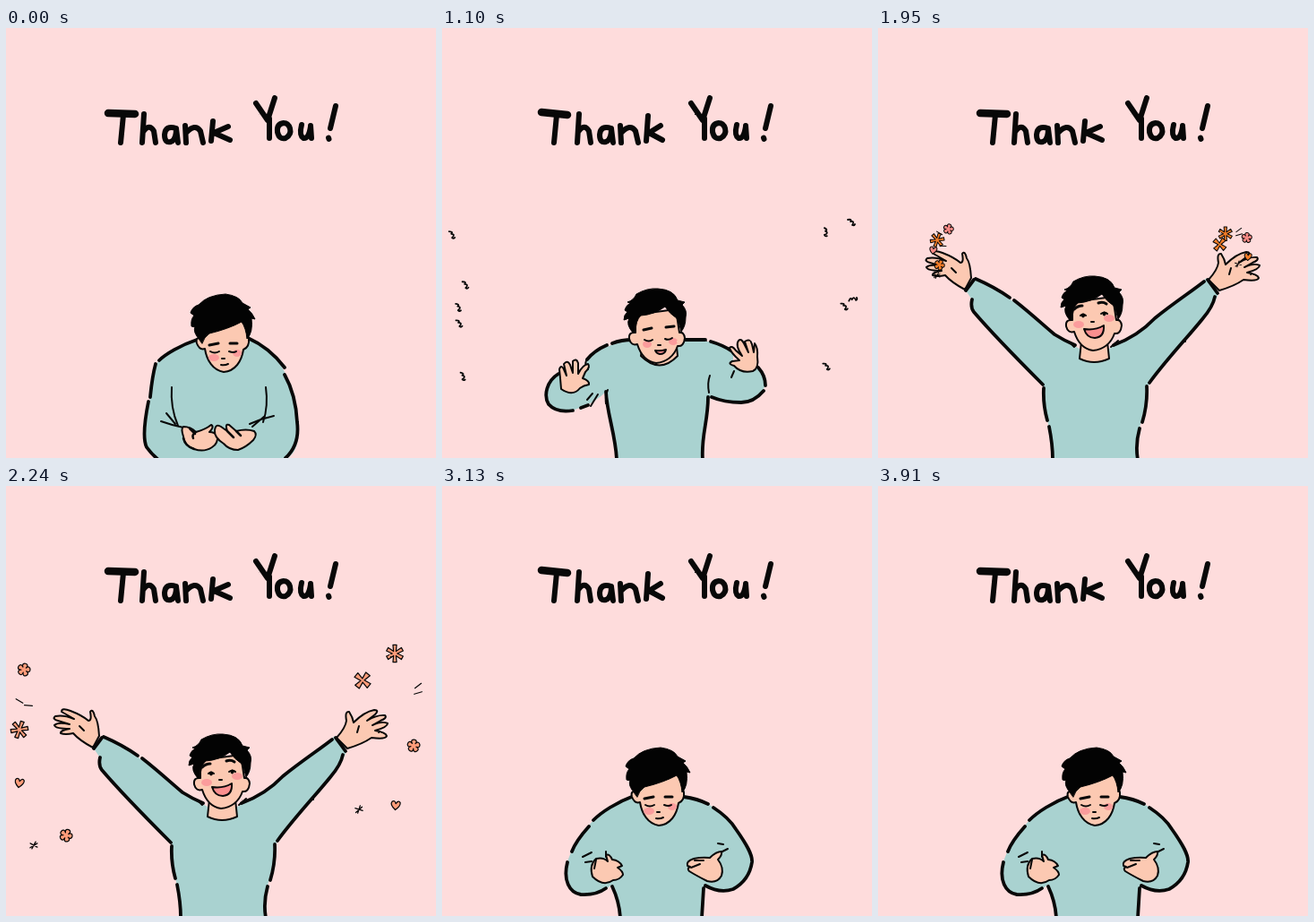
Recreate the animation shown at these times as an HTML page. Size 480 by 480 pixels, loop 4000 ms.

```html
<!DOCTYPE html>
<html lang="en">
<meta charset="utf-8">
<title>Thank You!</title>
<style>
  html, body { margin: 0; height: 100%; overflow: hidden; background: #fedcdc; }
  svg { display: block; width: 100vw; height: 100vh; }
  path, ellipse { fill: none; stroke: #080808; stroke-width: 2; stroke-linecap: round; stroke-linejoin: round; }
  .cloth { fill: #a9d2d0; stroke: none; }
  .skin { fill: #fcc9b2; }
  .hair { fill: #030303; stroke: #030303; stroke-width: 1; }
  .ink { stroke-width: 3.8; }
  .brow { stroke-width: 3; }
  .cheek { fill: #fb9c9c; stroke: none; }
  .mouth { fill: #fa8f8f; }
  .word path, #letters path { stroke-width: 6; }
  .word .fat { stroke-width: 8.5; }
</style>
<svg viewBox="0 0 480 480" role="img" aria-label="Thank You!">
  <defs>
    <filter id="rough" filterUnits="userSpaceOnUse" x="0" y="0" width="480" height="480" color-interpolation-filters="sRGB">
      <feTurbulence type="fractalNoise" baseFrequency=".15" seed="3"/>
      <feDisplacementMap in="SourceGraphic" scale="1.6" xChannelSelector="R" yChannelSelector="G"/>
    </filter>

    <g id="letters">
      <path d="M154 96L152 128M153 116Q160 106 165 115L167 128"/>
      <path d="M190 112Q178 108 177 119Q177 129 184 127Q190 125 190 112L192 128"/>
      <path d="M200 109L201 128M201 117Q211 106 217 115L220 128"/>
      <path d="M294 101L294 123M279 84L292 103L300 78"/>
      <path d="M310 106Q302 107 303 116Q305 125 312 123Q319 119 317 112Q315 106 310 106"/>
      <path d="M330 108Q327 120 332 123Q338 124 340 110M340 109L341 123"/>
      <path d="M368 87L362 112M360 122.500L360.500 124"/>
    </g>

    <g id="headDown">
      <path class="skin" d="M220 334L218 346Q211 345 213 352Q216 360 222 358C224 371 231 382 243 384C256 383 263 372 265 359Q272 356 271 347L265 325Z"/>
      <path class="hair" d="M213 344Q209 338 211 334L207 333Q206 325 210 321L206 318Q208 311 215 309Q225 298 245 297Q260 299 264 307L273 312L270 314Q275 318 278 325L274 324Q276 340 269 347Q268 335 263 328Q248 336 227 341Q221 345 219 352Z"/>
      <ellipse class="cheek" cx="232" cy="368" rx="6" ry="4"/>
      <ellipse class="cheek" cx="258" cy="363" rx="5" ry="4"/>
      <path d="M228 361q5 3 10 0M249 361q5 2 8 0M241 369h3M240 376q4 1 8-1"/>
      <path class="brow" d="M227 354L237 352M250 352L258 352"/>
    </g>

    <g id="headUp">
      <path class="skin" d="M217 306L217 326Q209 325 210 333Q212 341 219 339Q225 358 240 360Q258 358 264 341Q271 342 272 332Q271 325 266 326L262 300Z"/>
      <path class="hair" d="M214 326Q206 317 210 310L204 312Q204 306 208 303L205 301Q206 296 211 293L208 292Q215 290 218 283Q230 276 242 277Q260 278 264 290L272 292L269 295Q275 301 273 309Q273 319 268 325Q266 316 263 310Q255 305 250 297Q238 306 223 307Q217 312 217 326Z"/>
    </g>
  </defs>

  <g class="word" filter="url(#rough)">
    <path class="fat" d="M114 95L144 96"/>
    <path d="M131 97L128 128M231 104L229 126M248 110L232 117L250 125"/>
    <use href="#letters"/>
  </g>
  <g class="word" filter="url(#rough)">
    <path class="fat" d="M111 94L140 97"/>
    <path d="M128 97L125 128M230 98L228 126M244 109L231 117L246 125"/>
    <use href="#letters" x="-1"/>
  </g>

  <g id="figure" filter="url(#rough)">
    <!-- bowing -->
    <g>
      <path class="cloth" d="M213 348C195 354 178 364 169 373C162 392 162 405 160 418C155 437 152 458 157 468Q162 475 170 482L312 482C325 474 327 462 326 445C325 425 322 405 311 384C304 368 285 352 270 345Z"/>
      <path class="ink" d="M213 348C195 354 178 364 171 371M167 375C163 390 162 402 161 412M159 417C155 437 152 458 157 468Q162 475 170 482M270 346C288 354 302 367 311 379M311 387C320 403 324 420 325 440C327 456 323 470 312 480"/>
      <path d="M185 401C184 415 186 430 192 444M290 401C292 415 291 428 287 440M173 439Q184 443 198 446M179 430L189 442M299 433Q285 436 272 442M289 433L275 445"/>
      <path class="skin" d="M198 456Q195 447 198 445Q206 445 212 451Q223 448 229 443Q233 445 227 451Q233 451 236 455Q237 464 230 468Q221 474 210 470Q199 466 198 456Z"/>
      <path class="skin" d="M233 449Q234 441 240 445L247 450Q244 441 249 443L257 450Q268 447 277 450Q281 454 276 460Q268 468 259 471Q249 471 243 464Q232 457 233 449Z"/>
      <path d="M205 447l6 6M212 451q-5 3-3 7M247 450l7 7M257 450l5 5M198 458q2 9 12 12" style="stroke-width:2.500"/>
      <use href="#headDown"/>
    </g>
    <!-- hands at the chest -->
    <g>
      <path class="cloth" d="M214 346C190 356 172 368 163 380C150 396 140 412 138 430Q139 447 148 453Q165 460 180 452L190 445Q198 465 199 482L290 482L292 447Q308 456 325 449Q344 438 346 419C341 400 330 382 320 372Q300 352 270 346Z"/>
      <path class="ink" d="M214 346C195 353 178 364 169 373M164 380C155 390 148 400 145 408M140 420C135 440 142 454 155 456Q172 457 183 449M190 447Q198 464 199 482M270 347Q285 349 297 355M303 359Q320 370 328 383C340 400 347 412 346 420Q343 440 325 450Q310 455 294 446M292 449L290 482"/>
      <path d="M157 414L167 409M160 420L167 419M183 408V414M308 399L314 400M309 410L319 405"/>
      <path class="skin" d="M168 436Q164 423 172 416Q180 414 185 419L183 412Q187 410 190 417Q198 418 201 424L196 426Q202 430 202 434Q198 440 191 440Q180 448 168 436Z"/>
      <path class="skin" d="M274 424Q272 419 281 416Q290 414 299 415Q306 408 312 408Q313 412 308 417Q315 426 312 435Q307 444 296 441Q284 435 276 430Q273 427 277 425Z"/>
      <path d="M278 426l10-4M282 418l10 0M172 417l-2 10"/>
      <use href="#headDown" x="-1" y="-5"/>
    </g>
    <!-- arms half open -->
    <g>
      <path class="cloth" d="M213 348C190 351 172 360 161 371L162 384L133 384C118 392 112 410 118 420Q128 430 148 426Q170 420 185 404C184 430 194 455 195 482L291 482C289 455 297 440 297 412Q320 420 338 418Q362 408 362 392Q358 380 352 378L325 372L325 362C310 352 295 347 268 348Z"/>
      <path class="ink" d="M213 348Q200 348 190 352M184 354Q170 360 162 370M130 386C117 394 113 410 119 420Q128 430 146 427M155 424L163 421M183 406C184 430 194 455 195 482M270 348L294 348M300 350Q314 354 324 361M353 379Q361 388 361 399M359 405Q348 418 334 418Q315 418 301 412M297 412C297 440 289 455 291 482"/>
      <path d="M185 404Q182 412 183 419M174 409L166 422M168 408L162 415M298 407Q296 396 299 388M326 383L323 390M161 371Q159 376 163 381"/>
      <path class="skin" d="M133 403Q132 390 131 381Q133 375 136 381L139 388L136 375Q140 370 143 376L146 385L146 372Q150 368 152 374L152 386Q157 376 163 375Q166 378 160 384L157 391Q165 394 164 398Q158 399 154 402Q146 412 133 403Z"/>
      <path class="skin" d="M326 377Q318 375 324 372L332 371Q322 362 321 357Q324 354 328 360L335 366Q327 354 331 349Q334 346 337 352L342 362L338 350Q344 346 346 353L348 362L349 352Q353 357 352 367Q354 380 347 383Q334 386 326 377Z"/>
      <path class="skin" d="M223 358L222 366Q243 387 263 366L262 356Z"/>
      <use href="#headUp" x="-1" y="14"/>
      <ellipse class="cheek" cx="229" cy="353" rx="5" ry="4"/>
      <ellipse class="cheek" cx="258" cy="350" rx="5" ry="4"/>
      <path d="M226 348q5 3 9 0M249 347q4 2 8-1M241 354h3"/>
      <path class="brow" d="M225 337L234 335M250 334L259 333"/>
      <path class="mouth" d="M238 360Q244 361 250 359Q249 364 243 364Q239 363 238 360Z"/>
    </g>
    <!-- arms thrown up -->
    <g>
      <path class="skin" d="M104 279Q103 262 99 257Q97 248 94 252Q96 262 92 262Q85 256 72 251Q62 247 62 252L76 260Q64 255 55 257Q51 260 58 262L71 266Q58 263 54 267Q55 271 71 271Q60 273 61 276Q66 278 75 276Q82 284 97 292Z"/>
      <path class="skin" d="M369 281Q379 270 380 262Q378 251 383 252Q387 258 388 264Q400 252 411 250Q417 250 412 255L403 262Q415 255 423 256Q426 259 418 262L409 267Q420 262 426 265Q426 269 412 273Q424 275 425 279Q424 283 408 281Q398 288 381 293Z"/>
      <path d="M82 268l5 5M394 268l-2 7"/>
      <path class="cloth" d="M108 279C140 295 175 322 199 343Q212 352 225 358L225 369Q241 376 258 369L258 358Q285 345 310 322C330 308 350 292 367 279L380 297Q372 315 362 325C340 350 315 380 301 400C301 425 288 440 290 482L195 482Q193 450 187 430Q184 415 185 400C160 375 130 345 105 315L106 305L98 293Z"/>
      <path class="ink" d="M109 280Q130 289 147 301M152 304C170 318 185 332 197 342Q208 349 220 354M98 293L107 281M105 303Q103 312 107 317C130 344 160 374 184 398M185 402Q184 420 189 438M191 445Q195 465 195 482M263 354Q290 344 309 324C330 307 350 294 364 283M368 281L379 296M376 300Q374 311 362 325C345 346 322 370 303 396M300 400Q301 420 295 440M292 447Q287 465 290 482"/>
      <path d="M213 350l6 6M268 349l-8 7"/>
      <path class="skin" d="M227 350L225 369Q241 377 258 369L256 350Z"/>
      <use href="#headUp"/>
      <ellipse class="cheek" cx="224" cy="331" rx="6" ry="4"/>
      <ellipse class="cheek" cx="258" cy="324" rx="6" ry="4"/>
      <path class="brow" d="M219 314q4-4 9-4M246 307q5-2 9 1"/>
      <path d="M226 321q3-3 6 0M249 319q4-3 7 0M238 328h3"/>
      <ellipse class="hair" cx="229" cy="321" rx="1.500" ry="2"/>
      <ellipse class="hair" cx="252.500" cy="319" rx="1.500" ry="2"/>
      <path class="mouth" d="M230 336Q242 338 252 332Q253 345 242 346Q233 346 230 336Z"/>
    </g>
  </g>
  <g id="burst" filter="url(#rough)"></g>
</svg>
<script>
const LOOP = 4000, CYCLE = 1340;
const PINK = '#fa8a86', ORANGE = '#f57d28', PALE = '#ff9c7a', NONE = 'none';

// Closed ring of n petals; a small inner radius makes it spiky.
function ring(n, inner, round) {
  const at = (i, r) => [r * Math.sin(i * Math.PI / n), -r * Math.cos(i * Math.PI / n)].map(v => v.toFixed(1)).join(' ');
  let d = 'M' + at(-1, inner);
  for (let i = 0; i < 2 * n; i += 2)
    d += round ? `C${at(i - 1, 15)} ${at(i + 1, 15)} ${at(i + 1, inner)}` : `L${at(i - .4, 14)}L${at(i + .4, 14)}L${at(i + 1, inner)}`;
  return d + 'Z';
}
const SHAPES = {
  flower: ring(5, 4.5, true),
  star: ring(6, 4, false),
  cross: ring(4, 3, false),
  heart: 'M0 8Q-10 0-6-5Q-2-8 0-2Q4-9 7-4Q8 1 0 8Z',
  spark: 'M-6-2L6 2M2-6L-2 6M-5 5L5-4',
  dash: 'M-6-2L6 2',
  squiggle: 'M-4-3q5-1 3 2q5-1 2 4q2 1 3-1'
};

// shape, fill, angle, then the places at full bloom, while falling and as scraps
const pieces = [
  ['flower', PINK, 15, 88, 158, 20, 205, 11, 231],
  ['star', ORANGE, 20, 43, 202, 15, 272, 18, 312],
  ['heart', PINK, 10, 27, 242, 15, 331, 19, 330],
  ['flower', ORANGE, 25, 52, 302, 67, 390, 23, 389],
  ['spark', NONE, 10, 42, 345, 31, 401],
  ['dash', NONE, 12, 52, 174, 15, 240, 26, 287],
  ['dash', NONE, -15, 66, 226, 25, 245],
  ['star', ORANGE, 0, 343, 177, 434, 187, 457, 217],
  ['cross', ORANGE, 40, 320, 220, 398, 217, 428, 228],
  ['flower', PINK, 5, 429, 193, 455, 290, 449, 311],
  ['heart', ORANGE, 5, 434, 268, 435, 356, 429, 378],
  ['spark', NONE, 0, 394, 298, 394, 361],
  ['dash', NONE, -55, 397, 162, 460, 223, 459, 303],
  ['dash', NONE, -35, 398, 181, 460, 231]
].map(([shape, fill, angle, ...xy]) => {
  const el = document.createElementNS('http://www.w3.org/2000/svg', 'path');
  document.getElementById('burst').append(el);
  const hand = xy[0] < 240 ? [75, 250] : [405, 250];
  return { el, shape, fill, angle, xy: [...hand, ...xy] };
});

const words = document.querySelectorAll('.word');
const poses = document.getElementById('figure').children;
const show = (el, on) => { el.style.display = on ? '' : 'none'; };
const last = (steps, t) => steps.filter(s => s <= t).pop();
const KEYS = [560, 740, 900, 1100];

function drawBurst(phase) {
  const t = last([0, 610, 670, 740, 820, 900, 940, 1020, 1060, 1100, 1140, 1180], phase);
  const scraps = t >= 1060;
  const k = t < 740 ? 0 : t < 900 ? 1 : 2;
  const f = Math.min(1, (t - KEYS[k]) / (KEYS[k + 1] - KEYS[k]));
  const size = scraps ? 1 : t < 740 ? .4 + .6 * f : t < 900 ? 1 - .3 * f : .7 - .25 * f;
  for (const { el, shape, fill, angle, xy } of pieces) {
    const [x0, y0, x1 = x0, y1 = y0 + 30] = xy.slice(2 * k, 2 * k + 4);
    show(el, t >= 610 && t < 1180 && !(scraps && xy.length < 8));
    el.setAttribute('d', SHAPES[scraps ? 'squiggle' : shape]);
    el.setAttribute('transform', `translate(${x0 + (x1 - x0) * f} ${y0 + (y1 - y0) * f}) rotate(${angle}) scale(${size})`);
    el.style.fill = scraps ? NONE : t >= 900 && fill !== NONE ? PALE : fill;
    el.style.strokeWidth = 1.8;
  }
}

function draw(now) {
  const t = now % LOOP, phase = t % CYCLE;
  const swap = 330 - 40 * Math.floor(t / CYCLE);
  const second = phase >= swap && phase < 580 || phase >= 940 && phase < 1200;
  show(words[0], !second);
  show(words[1], second);
  const pose = phase < 450 ? 0 : phase < 530 ? 1 : phase < 610 ? 2 : phase < 1060 ? 3 : phase < 1220 ? 2 : 1;
  [...poses].forEach((el, i) => show(el, i === pose));
  drawBurst(phase);
  requestAnimationFrame(draw);
}
draw(0);
</script>
</html>
```
